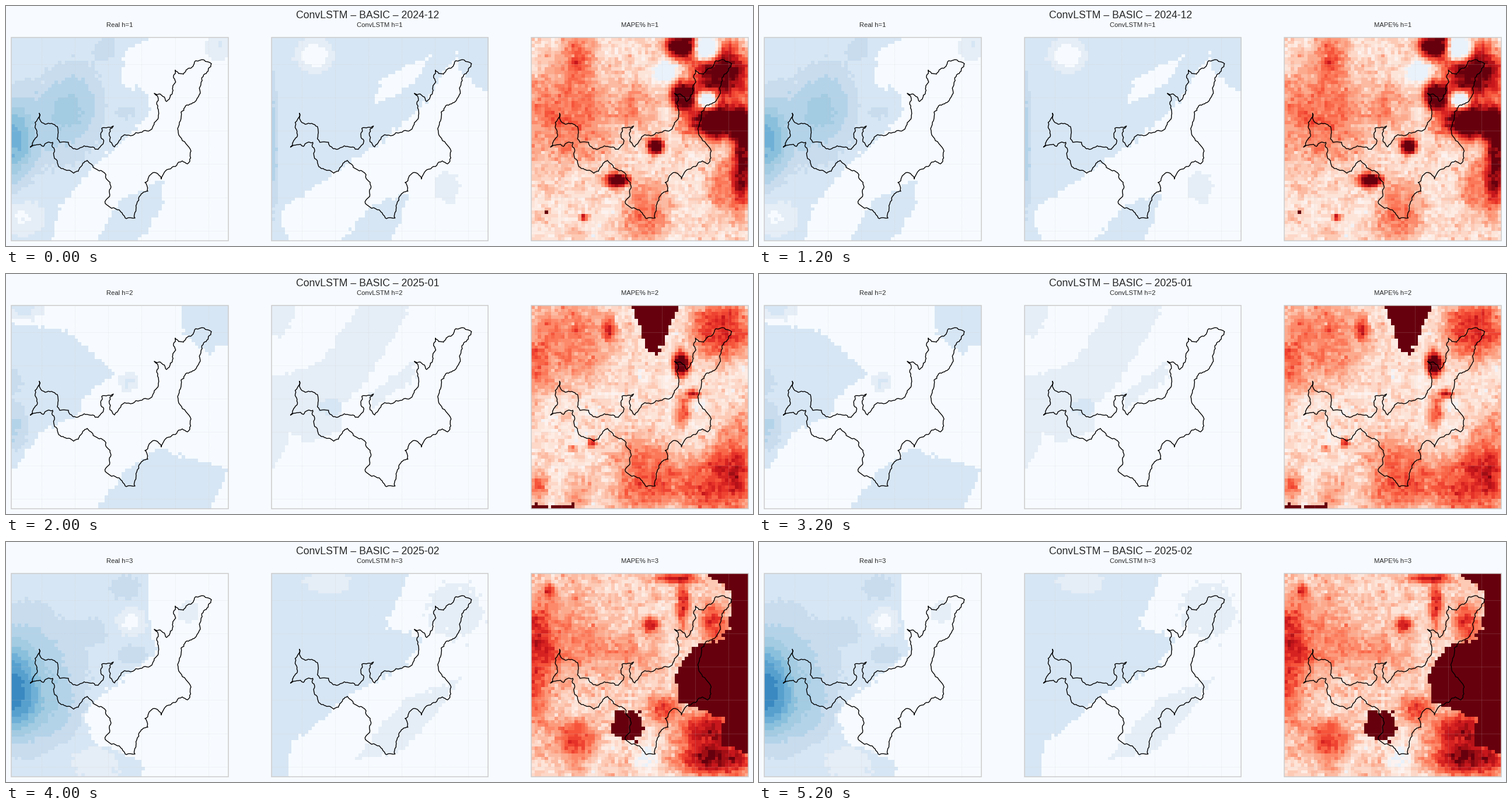
Recreate the animation shown at these times as a matplotlib script. Size 1280 px wide and 412 px high, loop 6000 ms.

```python
import numpy as np
import matplotlib.pyplot as plt
from matplotlib.animation import FuncAnimation
from matplotlib.colors import LinearSegmentedColormap, to_rgb
from matplotlib.patches import Rectangle
from matplotlib.path import Path

W, H, DPI = 1280, 412, 100
COLS, ROWS, CELL = 65, 61, 5.718
LEFT, TOP, STEP = 8.9, 54.4, 445.7
PW, PH = COLS * CELL, ROWS * CELL

plt.rcParams["font.family"] = "Liberation Sans"

BLUES = np.array([to_rgb(c) for c in (
    "#f7fbff", "#e5edf6", "#d7e6f4", "#c8dcee", "#b3d3e9", "#a3cbe2",
    "#8ac0dc", "#6fb0d7", "#57a0ce", "#3a89c1", "#2070b4", "#08519c")])
REDS = LinearSegmentedColormap.from_list("heat", [
    "#e9f1fa", "#fdf3ef", "#fee3d7", "#fdc6b0", "#fca487", "#fc8161",
    "#f95d40", "#ea362a", "#cb181d", "#a30f15", "#67000d"], N=22)

# Region border, clockwise, in stage pixels of the left panel
BORDER = [
    (42, 242), (50, 206), (57, 184), (67, 203), (88, 207), (92, 234), (107, 234),
    (120, 246), (158, 246), (164, 210), (184, 206), (178, 233), (186, 242), (203, 221),
    (230, 217), (261, 188), (261, 162), (254, 150), (264, 151), (275, 164), (285, 150),
    (290, 110), (304, 117), (325, 94), (352, 99), (334, 133), (330, 155), (300, 182),
    (308, 236), (317, 249), (311, 271), (302, 266), (266, 297), (252, 286), (238, 303),
    (243, 318), (224, 340), (221, 364), (206, 365), (194, 350), (170, 339), (177, 318),
    (164, 283), (139, 265), (116, 287), (89, 272), (83, 250), (80, 234), (64, 241)]


def cells(panel):
    x = LEFT + panel * STEP + (np.arange(COLS) + .5) * CELL
    y = TOP + (np.arange(ROWS) + .5) * CELL
    return np.meshgrid(x, y)


def paint(field, polys, panel, rng):
    """Set polygons (level, x, y, x, y, ...) with slightly ragged edges."""
    x, y = (np.clip(a + rng.normal(0, 2, a.shape), a.min(), a.max())
            for a in cells(panel))
    pts = np.column_stack([x.ravel(), y.ravel()])
    for level, *flat in polys:
        shape = Path(np.reshape(flat, (-1, 2)))
        field[shape.contains_points(pts).reshape(field.shape)] = level


def add_blobs(field, blobs, panel):
    """Add flat-topped bumps (x, y, rx, ry, strength)."""
    x, y = cells(panel)
    for bx, by, rx, ry, amp in blobs:
        d = ((x - bx) / rx) ** 2 + ((y - by) / ry) ** 2
        field += amp * np.exp(-.7 * d ** 1.4)


def smooth(a):
    p = np.pad(a, 1, mode="edge")
    return sum(p[i:i + ROWS, j:j + COLS] for i in range(3) for j in range(3)) / 9


def blue(panel, base, polys, blobs):
    rng = np.random.default_rng(panel + 1)
    field = np.full((ROWS, COLS), float(base))
    paint(field, polys, panel, rng)
    add_blobs(field, blobs, panel)
    field += rng.normal(0, .1, field.shape)
    return BLUES[np.clip(np.rint(field), 0, len(BLUES) - 1).astype(int)]


def red(base, polys, blobs):
    rng = np.random.default_rng(3)
    field = np.full((ROWS, COLS), base)
    add_blobs(field, blobs, 2)
    field += rng.normal(0, .045, field.shape)
    field += smooth(rng.normal(0, .11, field.shape))
    paint(field, polys, 2, rng)
    return REDS(np.clip(field, 0, 1))[..., :3]


def outline():
    """Roughen the border by repeated midpoint shifts."""
    rng = np.random.default_rng(4)
    pts = np.array(BORDER + BORDER[:1], float)
    for _ in range(4):
        step = np.diff(pts, axis=0)
        size = np.hypot(*step.T)
        side = np.column_stack([-step[:, 1], step[:, 0]])
        shift = rng.uniform(-.2, .2, len(step)) * (size > 4)
        out = np.empty((2 * len(pts) - 1, 2))
        out[::2] = pts
        out[1::2] = (pts[:-1] + pts[1:]) / 2 + side * shift[:, None]
        pts = out
    return pts


def december():
    real = blue(0, 2, [
        (0, 245, 54, 204, 80, 194, 130, 243, 150, 248, 188, 165, 262, 92, 345,
         80, 403, 381, 403, 381, 54),
        (2, 150, 403, 200, 330, 268, 300, 268, 345, 226, 403),
    ], [(9, 240, 30, 60, 3.4), (55, 205, 80, 62, 1.9), (118, 160, 40, 55, 1.7),
        (170, 72, 20, 20, .9), (205, 184, 18, 11, .9), (30, 365, 32, 25, -1.6),
        (365, 68, 20, 24, 1.4)])
    model = blue(1, 2, [
        (0, 770, 80, 775, 112, 827, 150, 827, 403, 480, 403, 470, 350, 575, 277,
         640, 238, 690, 190, 720, 165),
        (0, 690, 100, 730, 85, 690, 140, 628, 172, 645, 125),
        (2, 575, 403, 630, 340, 692, 322, 660, 403),
    ], [(528, 85, 26, 24, -2.3), (454, 240, 11, 100, 2.1), (755, 312, 22, 26, 1)])
    error = red(.23, [], [
        (960, 190, 75, 75, .3), (980, 88, 26, 38, .28), (1080, 170, 30, 35, .2),
        (1158, 68, 25, 22, .95), (1160, 155, 20, 22, 1), (1225, 112, 45, 45, .8),
        (1200, 75, 20, 18, -1), (1130, 112, 16, 16, -.5), (1202, 162, 15, 13, -.8),
        (1220, 200, 50, 27, .95), (1265, 255, 18, 80, .7), (1113, 241, 13, 13, .95),
        (1047, 299, 18, 11, .95), (1095, 352, 36, 50, .28), (1235, 310, 30, 45, .25),
        (990, 363, 7, 4, .7), (926, 355, 3, 3, .9)])
    return real, model, error


def january():
    real = blue(0, 0, [
        (2, 9, 85, 100, 95, 187, 170, 130, 215, 128, 240, 60, 272, 9, 340),
        (2, 300, 54, 381, 54, 381, 115, 345, 140, 298, 95),
        (2, 150, 403, 215, 330, 265, 300, 381, 335, 350, 403),
    ], [(9, 260, 24, 36, 1.7), (9, 185, 20, 20, 1), (30, 60, 30, 16, 1.8),
        (209, 186, 14, 14, 1.7)])
    model = blue(1, 0, [
        (1, 605, 54, 695, 54, 620, 180, 572, 230, 578, 270, 520, 290, 490, 270,
         454, 342, 454, 180, 540, 150),
        (1, 620, 208, 700, 148, 700, 180, 628, 230),
    ], [(463, 62, 26, 42, 1.2), (556, 230, 20, 16, 1)])
    error = red(.21, [
        (1, 1073, 54, 1153, 54, 1117, 136, 1100, 138),
        (1, 901, 397, 975, 397, 975, 403, 901, 403),
    ], [(958, 115, 75, 62, .3), (906, 180, 20, 50, .2), (1033, 92, 10, 20, .4),
        (1228, 92, 50, 48, .5), (1157, 155, 13, 20, .95), (1177, 206, 12, 8, .6),
        (1160, 235, 12, 24, .35), (1215, 362, 72, 50, .45), (1260, 300, 38, 60, .28),
        (1090, 345, 48, 62, .36), (1004, 290, 7, 7, .6), (972, 299, 7, 5, .45),
        (985, 370, 30, 25, .18), (912, 365, 14, 30, .3)])
    return real, model, error


def february():
    real = blue(0, 2, [
        (0, 240, 54, 250, 160, 262, 190, 170, 256, 132, 300, 152, 345, 235, 375,
         235, 403, 381, 403, 381, 54),
    ], [(9, 255, 38, 65, 4.6), (35, 235, 80, 100, 2.4), (72, 290, 40, 45, .9),
        (205, 78, 26, 22, .9), (215, 194, 22, 14, 1.4), (148, 155, 28, 20, .9),
        (215, 137, 22, 20, -1.8), (310, 120, 20, 20, .9), (150, 380, 45, 30, -.9)])
    model = blue(1, 2, [
        (0, 690, 54, 827, 54, 827, 403, 478, 403, 490, 345, 548, 300, 580, 268,
         680, 215, 718, 165, 650, 148),
        (1, 600, 375, 640, 318, 692, 265, 775, 235, 745, 285, 680, 360),
    ], [(550, 70, 42, 18, -1), (768, 118, 48, 48, 1)])
    error = red(.27, [
        (1, 1272, 54, 1200, 54, 1240, 82, 1246, 120, 1232, 165, 1175, 180,
         1147, 230, 1150, 272, 1230, 305, 1225, 348, 1272, 362),
        (1, 1040, 290, 1085, 290, 1097, 318, 1075, 343, 1038, 332),
    ], [(905, 210, 30, 95, .36), (950, 160, 60, 65, .2), (975, 340, 32, 32, .4),
        (932, 84, 8, 12, .3), (1105, 142, 13, 12, .55), (1055, 190, 55, 35, .15),
        (1160, 105, 10, 36, .5), (1212, 140, 18, 32, .4), (1150, 62, 35, 8, .5),
        (1125, 285, 25, 20, .4), (1200, 325, 45, 30, .55), (1220, 375, 65, 24, .6),
        (1100, 372, 22, 25, -.25)])
    return real, model, error


SCENES = [("2024-12", december()), ("2025-01", january()), ("2025-02", february())]
NAMES = ("Real", "ConvLSTM", "MAPE%")

fig = plt.figure(figsize=(W / DPI, H / DPI), dpi=DPI, facecolor=BLUES[0])
ax = fig.add_axes([0, 0, 1, 1])
ax.axis("off")
caption = dict(ha="center", va="baseline", color="#262626")
grid = dict(color="#cccccc", lw=.55, ls=":", alpha=.6, zorder=2)

images, labels = [], []
edge = outline()
for p, start in enumerate(SCENES[0][1]):
    x0 = LEFT + p * STEP
    images.append(ax.imshow(start, interpolation="nearest", aspect="auto",
                            extent=(x0, x0 + PW, TOP + PH, TOP), zorder=1))
    for k in range(6):
        gx, gy = x0 + 52 + 57.15 * k, TOP + 45.6 + 57.15 * k
        ax.plot([gx, gx], [TOP, TOP + PH], **grid)
        ax.plot([x0, x0 + PW], [gy, gy], **grid)
    ax.plot(edge[:, 0] + p * STEP, edge[:, 1], color="black", lw=1, zorder=3)
    ax.add_patch(Rectangle((x0, TOP), PW, PH, fill=False, ec="#cccccc", lw=1.1, zorder=4))
    labels.append(ax.text(x0 + PW / 2, 35.5, "", fontsize=8.15, **caption))
title = ax.text(619.8, 21, "", fontsize=12.67, **caption)
ax.set_xlim(0, W)
ax.set_ylim(H, 0)


def draw(i):
    month, fields = SCENES[i]
    title.set_text(f"ConvLSTM – BASIC – {month}")
    for img, label, field, name in zip(images, labels, fields, NAMES):
        img.set_data(field)
        label.set_text(f"{name} h={i + 1}")
    return [title, *images, *labels]


anim = FuncAnimation(fig, draw, frames=len(SCENES), interval=2000,
                     init_func=lambda: draw(0), repeat=True, repeat_delay=0)
plt.show()
```
